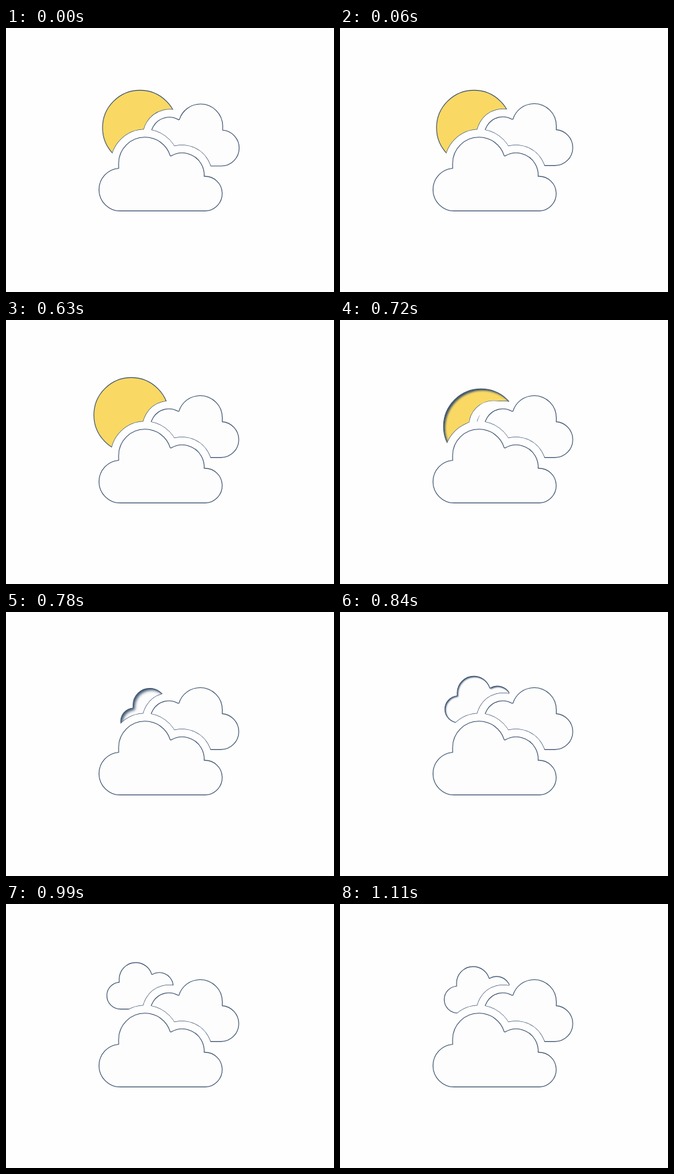
Animation of 492 by 396 pixels, one loop 1230 ms. Source, as an HTML page with a canvas:

```html
<!DOCTYPE html>
<html lang="en">
<head>
<meta charset="utf-8">
<title>Sun and clouds</title>
<style>
  html, body { margin: 0; width: 100%; height: 100%; overflow: hidden; background: #fefefe; }
  canvas { display: block; width: 492px; height: 396px; }
</style>
</head>
<body>
<canvas id="stage" width="492" height="396"></canvas>
<script>
const LOOP = 1230, STEP = 30, GAP = 11.8;
const LINE = '#3c526d', EDGE = '#4a607a', CLOUD = '#fdfdfe', SUN = '#f9d963';

const stage = document.getElementById('stage');
const view = stage.getContext('2d');
const scratch = document.createElement('canvas');
scratch.width = stage.width;
scratch.height = stage.height;
const pen = scratch.getContext('2d');
pen.lineJoin = 'round';

const clamp = v => Math.min(1, Math.max(0, v));
const ramp = (t, from, to) => clamp((t - from) / (to - from));
const smooth = u => u * u * (3 - 2 * u);
const mix = (a, b, u) => a + (b - a) * u;
const backIn = (u, s) => u * u * ((s + 1) * u - s);

// Cloud outline, with the centre of its largest lobe at the origin.
const unitCloud = new Path2D();
[[-37, 39, 32, 90, 265.5], [0, 0, 39.6, 180, 342.7],
 [55.8, 17, 33, 239.6, 363.5], [89.8, 45, 26, 268, 450]].forEach(([x, y, r, a, b]) =>
  unitCloud.arc(x, y, r, a * Math.PI / 180, b * Math.PI / 180));
unitCloud.closePath();

function cloud(x, y, scaleX, scaleY) {
  const path = new Path2D();
  path.addPath(unitCloud, new DOMMatrix([scaleX, 0, 0, scaleY, x, y]));
  return path;
}

function disc(x, y, r) {
  const path = new Path2D();
  path.arc(x, y, r, 0, 2 * Math.PI);
  return path;
}

function stroke(path, color, width) {
  pen.strokeStyle = color;
  pen.lineWidth = width;
  pen.stroke(path);
}

// Shadow cast into the shape from its upper left rim.
function innerShadow(path, depth) {
  const outside = new Path2D();
  outside.rect(-50, -50, 600, 500);
  outside.addPath(path);
  pen.save();
  pen.globalCompositeOperation = 'source-atop';
  pen.filter = `blur(${0.3 + 2.4 * depth}px)`;
  pen.translate(4 * depth, 4 * depth);
  pen.fillStyle = LINE;
  pen.fill(outside, 'evenodd');
  pen.restore();
}

// Draws a shape, cut back around everything in front of it.
function layer(path, color, depth, covers) {
  pen.globalCompositeOperation = 'source-over';
  pen.clearRect(0, 0, scratch.width, scratch.height);
  pen.fillStyle = color;
  pen.fill(path);
  if (depth > 0) innerShadow(path, depth);
  stroke(path, LINE, 1.1);
  for (const cover of covers) {
    pen.globalCompositeOperation = 'source-atop';
    stroke(cover, EDGE, 2 * GAP + 0.8);
    pen.globalCompositeOperation = 'destination-out';
    stroke(cover, '#000', 2 * GAP - 0.6);
    pen.fill(cover);
  }
  view.drawImage(scratch, 0, 0);
}

function sunAt(t) {
  const u = ramp(t, 480, 780);
  return disc(201 + 62 * backIn(u, 2.677), 149.6 + 44.7 * backIn(u, 2.253), 56.2);
}

// Rises in a straight line, overshoots, then settles.
function smallCloudAt(t) {
  let x, y;
  if (t < 840) {
    const u = (t - 720) / 120;
    x = mix(30.5, 1, u);
    y = mix(39, 2.5, u);
  } else if (t < 900) {
    const u = 1 - (1 - ramp(t, 840, 900)) ** 2;
    x = mix(1, -8.3, u);
    y = mix(2.5, -9.8, u);
  } else {
    const rest = 1 - smooth(ramp(t, 900, 1110));
    x = -8.3 * rest;
    y = -9.8 * rest;
  }
  return cloud(199.8 + x, 118.8 + y, 0.63, 0.63);
}

const front = cloud(208.5, 203.4, 1, 1);

function draw(t) {
  const nudge = 0.6 * (1 - ramp(t, 0, 60));
  const back = cloud(291.2 + nudge, 146.7 + nudge, -0.84, 0.84);
  const nearby = [back, front];
  const small = t >= 690 ? smallCloudAt(t) : null;

  view.clearRect(0, 0, stage.width, stage.height);
  if (t < 780) {
    layer(sunAt(t), SUN, 0.9 * ramp(t, 660, 750), small ? [small, ...nearby] : nearby);
  }
  if (small) layer(small, CLOUD, 1 - ramp(t, 720, 900), nearby);
  layer(back, CLOUD, 0, [front]);
  layer(front, CLOUD, 0, []);
}

const start = performance.now();
function tick() {
  const t = (performance.now() - start) % LOOP;
  draw(Math.floor(t / STEP) * STEP);
  requestAnimationFrame(tick);
}
tick();
</script>
</body>
</html>
```
